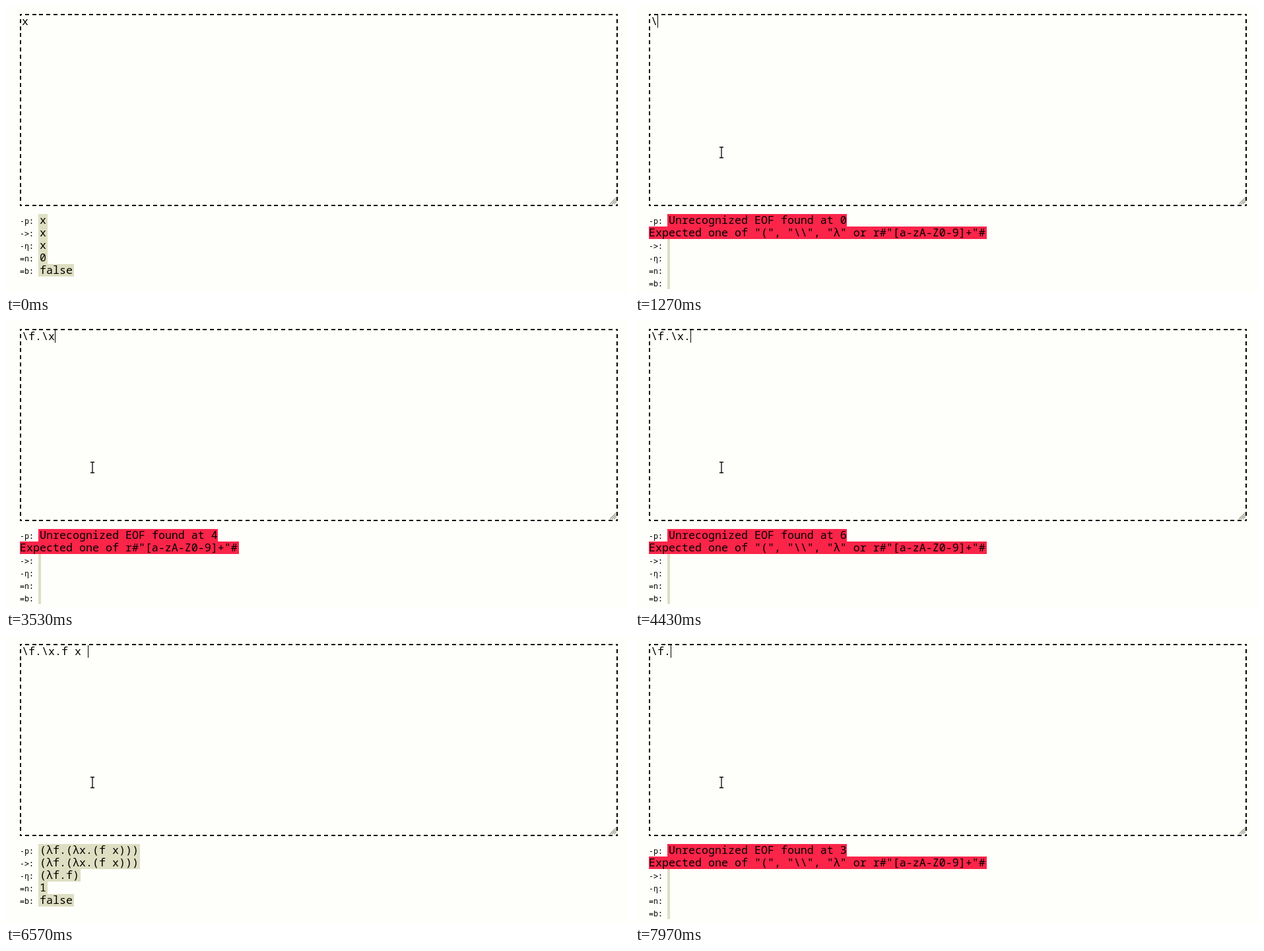
Animation of 944x436 px, one loop 8 s. Source, as an HTML page:

```html
<!DOCTYPE html>
<html lang="en">
<head>
<meta charset="utf-8">
<title>Lambda calculus</title>
<style>
  html, body { margin: 0; width: 100%; height: 100%; overflow: hidden; background: #fefefa; }
  svg { display: block; }
  text {
    font: 16.667px "Noto Sans Mono", "DejaVu Sans Mono", monospace;
    font-variant-ligatures: none; white-space: pre; fill: #000;
  }
  .label { font: 11.667px "DejaVu Sans Mono", "Noto Sans Mono", monospace; }
  .ok { fill: #dedec2; }
  .bad { fill: #fb2449; }
</style>
</head>
<body>
<svg width="944" height="436" viewBox="0 0 944 436">
  <g id="box" stroke="#000" stroke-width="2" shape-rendering="crispEdges"></g>
  <path d="M915 301L925 291M918 301L925 294M921 301L925 297" stroke="#a2a290" stroke-width="1.4" fill="none"/>
  <text id="input" x="24" y="29"></text>
  <rect id="caret" y="14" width="1" height="19"/>
  <g id="results"></g>
  <g id="pointer" fill="none">
    <path d="M128 214.5H134M131 214V231M128 230.5H134" stroke="#fff" stroke-width="3"/>
    <path d="M128 214.5H134M131 214V231M128 230.5H134" stroke="#000" stroke-width="1.3"/>
  </g>
</svg>
<script>
const LOOP = 8000, LAG = 100, CHAR = 10, ROW = 19, LEFT = 21, VALUE = 49, TOP = 316;
const POINTER_ON = 30, CARET_ON = 430;

const FULL = "\\f.\\x.f x ";
// [time, number of characters of FULL in the box]
const KEYS = [
  [865, 0], [1230, 1], [1430, 2], [1665, 3], [2565, 4], [3525, 5], [3800, 6],
  [4725, 7], [5130, 8], [5520, 9], [6165, 10],
  [7200, 9], [7300, 8], [7400, 7], [7500, 6], [7620, 5], [7740, 4], [7850, 3]
];

const LABELS = ["-p:", "->:", "-η:", "=n:", "=b:"];
const K = "(λf.(λx.f))", ONE = "(λf.(λx.(f x)))";
const VALUES = {
  "x": ["x", "x", "x", "0", "false"],
  "\\f.\\x.f": [K, K, K, "1", "true"],
  "\\f.\\x.f x": [ONE, ONE, "(λf.f)", "1", "false"]
};
const IDENT = 'r#"[a-zA-Z0-9]+"#';

const $ = id => document.getElementById(id);

function add(parent, tag, attrs, text = "") {
  const el = document.createElementNS("http://www.w3.org/2000/svg", tag);
  for (const k in attrs) el.setAttribute(k, attrs[k]);
  el.textContent = text;
  $(parent).append(el);
}

// Whole number of dashes per side, with half a dash at each corner
function side(x1, y1, x2, y2) {
  const dash = 6, length = x2 - x1 + y2 - y1;
  const period = length / Math.round(length / 10.8);
  add("box", "line", {
    x1, y1, x2, y2,
    "stroke-dasharray": [dash, period - dash], "stroke-dashoffset": dash / 2
  });
}

function drawBox(l, t, r, b) {
  side(l, t + 1, r, t + 1);
  side(l, b - 1, r, b - 1);
  side(l + 1, t, l + 1, b);
  side(r - 1, t, r - 1, b);
}

function inputAt(t) {
  let text = "x";
  for (const [at, n] of KEYS) if (t >= at) text = FULL.slice(0, n);
  return text;
}

function expected(src) {
  if (src.endsWith("\\")) return IDENT;
  if (/\\\w$/.test(src)) return '"."';
  return '"(", "\\\\", "λ" or ' + IDENT;
}

// One filled line of a value; padding sits only at the ends of the value
function line(text, x, row, kind, padLeft, padRight) {
  const y = TOP + row * ROW;
  add("results", "rect", { x, y, width: padLeft + text.length * CHAR + padRight, height: ROW, class: kind });
  add("results", "text", { x: x + padLeft, y: y + 15 }, text);
}

function showResults(src) {
  $("results").textContent = "";
  const values = VALUES[src];
  let row = 0;
  LABELS.forEach((name, i) => {
    add("results", "text", { x: LEFT, y: TOP + row * ROW + 15, class: "label" }, name);
    if (!values && i === 0) {
      line("Unrecognized EOF found at " + src.length, VALUE, row++, "bad", 2, 0);
      line("Expected one of " + expected(src), LEFT, row++, "bad", 0, 2);
    } else {
      line(values ? values[i] : "", VALUE, row++, "ok", 2, 2);
    }
  });
}

let shownInput = null, shownResult = null;

function draw(t) {
  const text = inputAt(t), src = inputAt(t - LAG).trimEnd();
  if (text !== shownInput) {
    $("input").textContent = shownInput = text;
    $("caret").setAttribute("x", 24 + text.length * CHAR);
  }
  if (src !== shownResult) showResults(shownResult = src);
  $("caret").style.display = t >= CARET_ON ? "" : "none";
  $("pointer").style.display = t >= POINTER_ON ? "" : "none";
}

drawBox(21, 12, 927, 304);
const start = performance.now();
function tick() {
  draw((performance.now() - start) % LOOP);
  requestAnimationFrame(tick);
}
tick();
</script>
</body>
</html>
```
